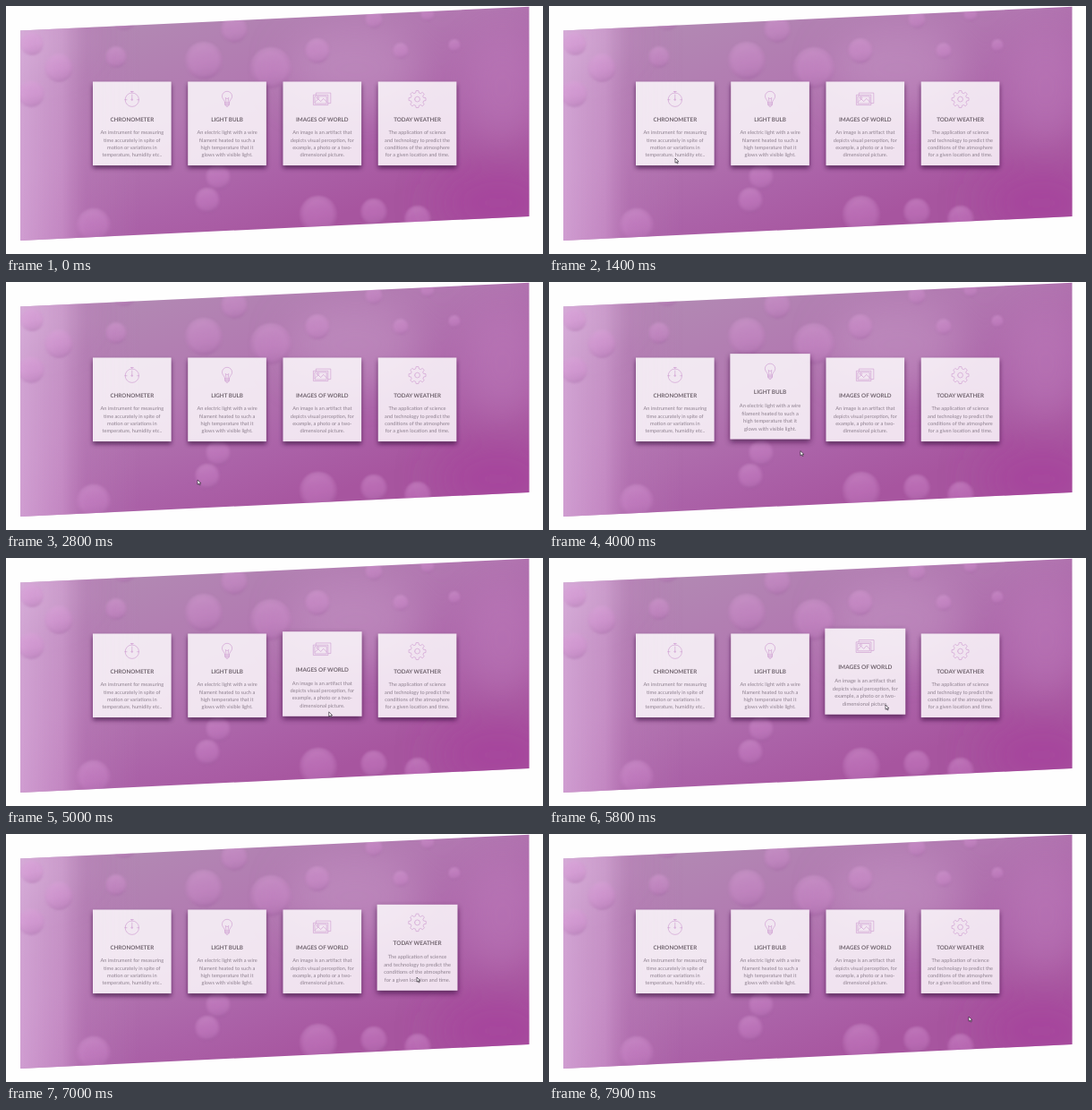
Animation, 600 px wide and 277 px high, one loop 8000 ms. Source, as an HTML page:

```html
<!DOCTYPE html>
<html lang="en">
<head>
<meta charset="utf-8">
<title>Feature cards</title>
<style>
  html, body { margin: 0; width: 100%; height: 100%; overflow: hidden; background: #fefefe; }
  svg { display: block; width: 600px; height: 277px; }
  text { font-family: Lato, "Open Sans", sans-serif; text-anchor: middle; text-rendering: geometricPrecision; }
  .title { font-size: 6.27px; font-weight: 700; fill: #71656f; }
  .body { font-size: 5.65px; fill: #8d808e; }
  .icon { fill: none; stroke: #cb98cf; stroke-width: .6; stroke-linejoin: round; stroke-linecap: round; }
</style>
</head>
<body>
<svg viewBox="0 0 600 277">
  <defs>
    <clipPath id="banner"><path d="M16 27.5L584.5 .7V235L16 262Z"/></clipPath>
    <clipPath id="outside"><path clip-rule="evenodd" d="M-70-70H70V80H-70ZM-43.8-46.8V46.8H43.8V-46.8Z"/></clipPath>
    <linearGradient id="base" gradientUnits="userSpaceOnUse" x1="200" y1="0" x2="300" y2="262">
      <stop offset="0" stop-color="#b288b3"/>
      <stop offset=".4" stop-color="#b278b1"/>
      <stop offset=".75" stop-color="#ab62a8"/>
      <stop offset="1" stop-color="#a7559f"/>
    </linearGradient>
    <linearGradient id="side" gradientUnits="userSpaceOnUse" x1="16" y1="0" x2="150" y2="0">
      <stop offset="0" stop-color="#dbaedd" stop-opacity=".75"/>
      <stop offset=".35" stop-color="#d29dd2" stop-opacity=".6"/>
      <stop offset=".55" stop-color="#b878b6" stop-opacity=".4"/>
      <stop offset="1" stop-color="#b878b6" stop-opacity="0"/>
    </linearGradient>
    <radialGradient id="bubble">
      <stop offset="0" stop-color="#d58ed3" stop-opacity=".34"/>
      <stop offset=".75" stop-color="#d893d6" stop-opacity=".3"/>
      <stop offset="1" stop-color="#c27cc0" stop-opacity=".12"/>
    </radialGradient>
    <linearGradient id="shade" x1=".3" y1="0" x2=".5" y2="1">
      <stop offset="0" stop-color="#e9bde8" stop-opacity=".22"/>
      <stop offset=".5" stop-color="#d48cd0" stop-opacity=".08"/>
      <stop offset="1" stop-color="#7c3f80" stop-opacity=".2"/>
    </linearGradient>
    <filter id="soft" x="-100%" y="-100%" width="300%" height="300%"><feGaussianBlur stdDeviation="22"/></filter>
    <filter id="blur" x="-30%" y="-30%" width="160%" height="160%"><feGaussianBlur stdDeviation="2.9"/></filter>
    <filter id="smooth"><feGaussianBlur stdDeviation=".8"/></filter>
  </defs>
  <g clip-path="url(#banner)">
    <rect width="600" height="277" fill="url(#base)"/>
    <g filter="url(#soft)">
      <ellipse cx="30" cy="35" rx="50" ry="30" fill="#e0c6e2" opacity=".5"/>
      <ellipse cx="390" cy="70" rx="75" ry="45" fill="#c597c6" opacity=".5"/>
      <ellipse cx="555" cy="90" rx="45" ry="65" fill="#bf80be" opacity=".5"/>
      <ellipse cx="550" cy="220" rx="70" ry="40" fill="#a63f9c" opacity=".6"/>
    </g>
    <rect width="160" height="277" fill="url(#side)"/>
    <g id="bubbles" filter="url(#smooth)"></g>
  </g>
  <g id="cards"></g>
  <path id="cursor" d="M0 0V5.2L1.3 4.1L2.2 6L3.1 5.6L2.3 3.8H3.9Z" fill="#fff" stroke="#2c2430" stroke-width=".65"/>
</svg>
<script>
const LOOP = 8000, STEP = 100, RISE = 350, FALL = 400;
const $ = id => document.getElementById(id);

function add(parent, tag, attrs, text) {
  const node = document.createElementNS("http://www.w3.org/2000/svg", tag);
  for (const key in attrs) node.setAttribute(key, attrs[key]);
  if (text) node.textContent = text;
  return parent.appendChild(node);
}

function bubble(cx, cy, r) {
  for (const name of ["bubble", "shade"]) add($("bubbles"), "circle", { cx, cy, r, fill: `url(#${name})` });
}

// Main bubbles: x, y, radius
[
  [29, 42, 13], [59, 69, 16], [28, 98, 15], [132, 11, 16], [123, 57, 12],
  [221, 61, 21], [296, 69, 23], [255, 26, 15], [348, 50, 14],
  [225, 217, 14], [237, 191, 14], [98, 245, 19], [349, 233, 21], [411, 230, 15], [460, 238, 15]
].forEach(spot => bubble(...spot));

// A rising chain of small bubbles on the right
for (let i = 0; i < 4; i++) bubble(411 + i * 30, 15 + (i % 2) * 38 - i * 3, 10 - i);

function gearPath(teeth) {
  const points = [], pitch = 2 * Math.PI / teeth;
  for (let i = 0; i < teeth; i++) {
    for (const [offset, r] of [[-.32, 7.4], [-.19, 9.6], [.19, 9.6], [.32, 7.4]]) {
      const angle = (i + offset) * pitch;
      points.push((r * Math.cos(angle)).toFixed(2) + " " + (r * Math.sin(angle)).toFixed(2));
    }
  }
  return "M" + points.join("L") + "Z";
}
const ring = (r, x = 0, y = 0) => `M${x - r} ${y}a${r} ${r} 0 1 0 ${2 * r} 0a${r} ${r} 0 1 0 ${-2 * r} 0`;

const cards = [
  {
    title: "CHRONOMETER", enter: 1400, leave: 2120,
    lines: ["An instrument for measuring", "time accurately in spite of", "motion or variations in", "temperature, humidity etc.."],
    icon: ring(7.7, 0, .6) + ring(.8, 0, .6) + "M0-.4V-5M-1.5-8.6H1.5M0-8.6V-7.1M-7.7 .6H-5.8M7.7 .6H5.8"
  },
  {
    title: "LIGHT BULB", enter: 3050, leave: 3870,
    lines: ["An electric light with a wire", "filament heated to such a", "high temperature that it", "glows with visible light."],
    icon: "M-2.4 3.6C-2.4 1-5.6 0-5.6-3.2A5.6 5.6 0 0 1 5.6-3.2C5.6 0 2.4 1 2.4 3.6ZV6.6H2.4V3.6M-2.4 5.1H2.4M-1.4 6.6L-.8 8.2H.8L1.4 6.6M-1 3.4L-1.8-1.6L0-.4L1.8-1.6L1 3.4"
  },
  {
    title: "IMAGES OF WORLD", enter: 4850, leave: 5850,
    lines: ["An image is an artifact that", "depicts visual perception, for", "example, a photo or a two-", "dimensional picture."],
    icon: "M-9.5-4.8H6.5V6.5H-9.5ZM-7-4.8V-7H9.5V4.5H6.5M-7.9-3.2H4.9V4.9H-7.9ZM-7.9 3L-4.4-.2L-1.6 2.6L1.4-.8L4.9 2.8" + ring(1.1, -4.8, -1.4)
  },
  {
    title: "TODAY WEATHER", enter: 6680, leave: 7530,
    lines: ["The application of science", "and technology to predict the", "conditions of the atmosphere", "for a given location and time."],
    icon: gearPath(8) + ring(2.9)
  }
];

const box = { x: -43.8, y: -46.8, width: 87.6, height: 93.6 };
for (const card of cards) {
  card.node = add($("cards"), "g", {});
  const shadow = add(card.node, "g", { "clip-path": "url(#outside)" });
  add(shadow, "rect", { ...box, y: -43.8, fill: "#35083a", opacity: .68, filter: "url(#blur)" });
  add(card.node, "rect", { ...box, fill: "#fff", opacity: .82 });
  add(card.node, "path", { class: "icon", d: card.icon, transform: "translate(0 -27.2)" });
  add(card.node, "text", { class: "title", y: -2.5 }, card.title);
  card.lines.forEach((line, i) => add(card.node, "text", { class: "body", y: 11.9 + i * 8.4 }, line));
}

// Pointer moves; it rests in between
const entry = { from: 700, x: 94.5, y: 264 };
const moves = [
  { from: 700, to: 1200, x: 141, y: 170 },
  { from: 1400, to: 1600, x: 145, y: 160 },
  { from: 2100, to: 2500, x: 214, y: 221 },
  { from: 2800, to: 3400, x: 262, y: 160 },
  { from: 3700, to: 4500, x: 293, y: 207 },
  { from: 4600, to: 5300, x: 376, y: 164 },
  { from: 5800, to: 6600, x: 445, y: 212 },
  { from: 6700, to: 7000, x: 459, y: 160 },
  { from: 7500, to: 7900, x: 469, y: 204 }
];

const progress = (t, from, to) => Math.min(1, Math.max(0, (t - from) / (to - from)));
const easeOut = p => p * (2 - p);
const easeInOut = p => p * p * (3 - 2 * p);

function pointerAt(t) {
  let { x, y } = entry;
  for (const move of moves) {
    const p = easeOut(progress(t, move.from, move.to));
    x += (move.x - x) * p;
    y += (move.y - y) * p;
  }
  return `translate(${x} ${y})`;
}

function render(t) {
  cards.forEach(({ node, enter, leave }, i) => {
    const lift = easeInOut(progress(t, enter, enter + RISE)) - easeInOut(progress(t, leave, leave + FALL));
    node.setAttribute("transform", `translate(${140.8 + i * 106.25} ${131.3 - 4.6 * lift}) scale(${1 + .026 * lift})`);
  });
  $("cursor").setAttribute("visibility", t < entry.from ? "hidden" : "visible");
  $("cursor").setAttribute("transform", pointerAt(t));
}

const start = performance.now();
function tick() {
  const t = (performance.now() - start) % LOOP;
  render(Math.floor(t / STEP) * STEP);
  requestAnimationFrame(tick);
}
tick();
</script>
</body>
</html>
```
